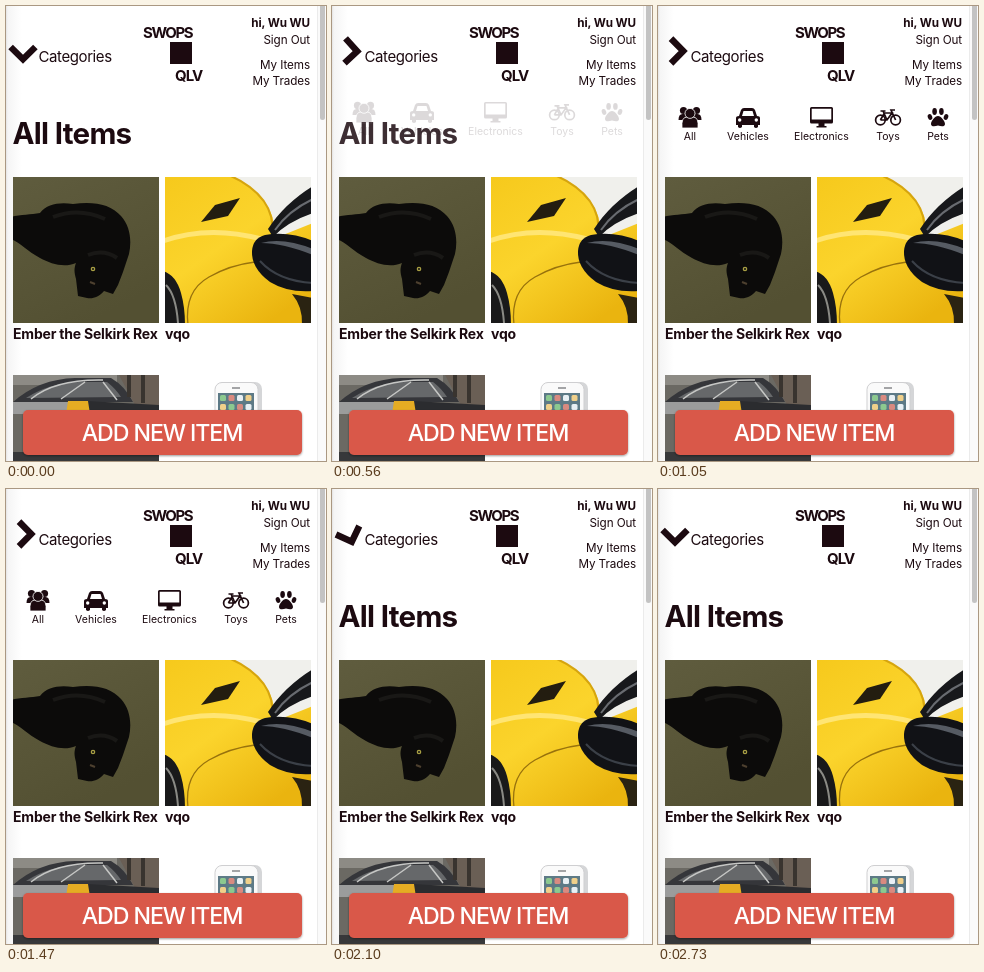
Recreate the animation shown at these times as an HTML page. Size 320 px wide and 455 px high, loop 2.8 s.

```html
<!DOCTYPE html>
<html lang="en">
<head>
<meta charset="utf-8">
<title>Item list</title>
<style>
html, body { margin: 0; width: 100%; height: 100%; overflow: hidden; background: #fff; }
svg { display: block; }
text { font-family: Inter, Roboto, "Liberation Sans", sans-serif; fill: #1c0a10; }
.bold { font-weight: 700; }
.nav { font-size: 11.7px; text-anchor: end; letter-spacing: -.1px; }
.name { font-size: 14px; font-weight: 700; letter-spacing: -.2px; }
#menu { font-size: 10.5px; text-anchor: middle; fill: #1c0a10; }
.line { fill: none; stroke: #1c0a10; stroke-width: 1.7; }
</style>
</head>
<body>
<svg width="320" height="455" viewBox="0 0 320 455">
  <defs>
    <linearGradient id="edge">
      <stop offset="0" stop-color="#e4e4e4"/><stop offset=".12" stop-color="#f5f5f5"/><stop offset="1" stop-color="#fff"/>
    </linearGradient>
    <linearGradient id="carpet" x2=".5" y2="1">
      <stop offset="0" stop-color="#5f5c3e"/><stop offset="1" stop-color="#535032"/>
    </linearGradient>
    <linearGradient id="paint" x2=".7" y2="1">
      <stop offset="0" stop-color="#f6c91c"/><stop offset=".5" stop-color="#fbd42c"/><stop offset="1" stop-color="#eab40f"/>
    </linearGradient>
    <clipPath id="frame"><path d="M0 0h146v146H0z"/></clipPath>
    <filter id="soft"><feGaussianBlur stdDeviation=".7"/></filter>
    <filter id="shade" x="-5%" y="-10%" width="110%" height="130%">
      <feDropShadow dx="0" dy="1" stdDeviation="1.3" flood-opacity=".4"/>
    </filter>
  </defs>

  <path d="M0 0h16v455H0z" fill="url(#edge)"/>
  <path d="M311 0h9v455h-9z" fill="#fafafa"/>
  <path d="M311.5 0v455" stroke="#ebebeb"/>
  <rect x="314" y="-4" width="5" height="118" rx="2.5" fill="#c3c3c3"/>

  <path id="arrow" d="M4.600 41L17 53.200 29.400 41" fill="none" stroke="#1c0a10" stroke-width="6.500"/>
  <text x="32.500" y="56" font-size="15" letter-spacing="-.4">Categories</text>

  <text class="bold" x="137" y="32" font-size="15" letter-spacing="-1.4">SWOPS</text>
  <path d="M164 36h22v22h-22z" fill="#1c0a10"/>
  <text class="bold" x="169" y="75" font-size="15" letter-spacing="-1">QLV</text>

  <text class="nav bold" x="304" y="21">hi, Wu WU</text>
  <text class="nav" x="304" y="38">Sign Out</text>
  <text class="nav" x="304" y="63">My Items</text>
  <text class="nav" x="304" y="79">My Trades</text>

  <text id="title" class="bold" x="6.500" y="138" font-size="29.500" letter-spacing="-.7">All Items</text>

  <g id="menu">
    <g transform="translate(32 111)">
      <circle cx="-6.5" cy="-6.5" r="3.6"/><circle cx="6.5" cy="-6.5" r="3.6"/>
      <path d="M-11.5 3q0-6 4-6h15q4 0 4 6z"/>
      <path d="M-8 11q-1-11 5-11h6q6 0 5 11z" stroke="#fff" stroke-width=".8"/>
      <circle cy="-3.6" r="5" stroke="#fff" stroke-width=".8"/>
      <text y="23">All</text>
    </g>
    <g transform="translate(90 111)">
      <path fill-rule="evenodd" d="M-12 8V1q0-2 3-2l2-6q1-2 3-2h8q2 0 3 2l2 6q3 0 3 2v7h-2v2q-2 2-4 0V8H-6v2q-2 2-4 0V8zM-6-1H6L4.500-6h-9z"/>
      <circle cx="-8.300" cy="3" r="1.700" fill="#fff"/><circle cx="8.300" cy="3" r="1.700" fill="#fff"/>
      <text y="23">Vehicles</text>
    </g>
    <g transform="translate(163.500 111)">
      <path fill-rule="evenodd" d="M-10-10h20q1.500 0 1.500 1.500V5q0 1.500-1.500 1.500H3V9h2v1.500H-5V9h2V6.500h-7q-1.500 0-1.500-1.500V-8.500q0-1.500 1.500-1.500zM-9.800-8.300V2.500H9.800V-8.300z"/>
      <text y="23">Electronics</text>
    </g>
    <g transform="translate(230 111)">
      <g class="line">
        <circle cx="-7.600" cy="3" r="4.800"/><circle cx="7.600" cy="3" r="4.800"/>
        <path d="M-7.600 3l4-7H4L-1 3h-6.600M-1 3l-4-9m-2.500 0h5M7.600 3L3-7h4"/>
      </g>
      <text y="23">Toys</text>
    </g>
    <g transform="translate(280 111)">
      <path d="M0-1c3 0 7 5 7 8s-4 2.500-7 1.500C-3 9.500-7 10-7 7s4-8 7-8z"/>
      <ellipse cx="-3.400" cy="-5.500" rx="2.300" ry="3.400"/><ellipse cx="3.400" cy="-5.500" rx="2.300" ry="3.400"/>
      <ellipse cx="-8" cy="0" rx="2.200" ry="3" transform="rotate(-20 -8 0)"/>
      <ellipse cx="8" cy="0" rx="2.200" ry="3" transform="rotate(20 8 0)"/>
      <text y="23">Pets</text>
    </g>
  </g>

  <!-- cat -->
  <g transform="translate(7 171)" clip-path="url(#frame)">
    <path d="M0 0h146v146H0z" fill="url(#carpet)"/>
    <g filter="url(#soft)">
      <path d="M-2 40C8 37 18 38 27 36 34 27 46 25 60 27c20-3 38 0 48 12 9 10 11 24 8 38l-6 18-5 13-5 9-9-3c-5 6-11 8-17 7l-9-2-2-17c-2-7-2-11 0-16-12 5-25 1-36-5C14 74 8 66-2 62z" fill="#0c0b0a"/>
      <path d="M40 40q26-10 52 2M75 78q16-6 29 3" fill="none" stroke="#191816" stroke-width="4"/>
      <circle cx="80" cy="92" r="2.300" fill="#a9a044"/><circle cx="80" cy="92" r="1" fill="#111"/>
      <path d="M77 105l5 2" stroke="#4d402f" stroke-width="2"/>
    </g>
  </g>

  <!-- yellow car -->
  <g transform="translate(159 171)" clip-path="url(#frame)">
    <path d="M0 0h146v146H0z" fill="url(#paint)"/>
    <g filter="url(#soft)">
      <path d="M64-2h84v48l-40 16Q116 24 64-2z" fill="#f0f0ec"/>
      <path d="M64-2Q112 20 107 58" fill="none" stroke="#d6a50e" stroke-width="2"/>
      <path d="M148 9Q119 27 103 52l5 8q14-15 40-24z" fill="#17181b"/>
      <path d="M148 22q-25 12-38 31" fill="none" stroke="#686b70" stroke-width="2"/>
      <path d="M36 45l14-17 25-7-12 18z" fill="#231d10"/>
      <path d="M-2 64Q44 48 96 62" fill="none" stroke="#ffe573" stroke-width="5"/>
      <path d="M23 148Q19 114 44 100 65 88 90 85" fill="none" stroke="#98720c" stroke-width="1.300"/>
      <path d="M-2 94q13 4 18 22 4 14 4 32H-2z" fill="#19191a"/>
      <path d="M1 108q10 10 12 38" fill="none" stroke="#8a8a85" stroke-width="2"/>
      <path d="M127 117l21 4v27h-11q1-18-10-31z" fill="#2a2312"/>
      <path d="M87 74q1-13 13-16 24-4 48 6v50q-25 2-43-9-19-14-18-31z" fill="#111216"/>
      <path d="M96 66q22-6 52 6v6q-30-12-52-12z" fill="#565b63"/>
      <path d="M95 84q18 20 53 22" fill="none" stroke="#3b4048" stroke-width="2"/>
    </g>
  </g>

  <text class="name" x="7" y="333">Ember the Selkirk Rex</text>
  <text class="name" x="159" y="333">vqo</text>

  <!-- silver car -->
  <g transform="translate(7 369)" clip-path="url(#frame)">
    <path d="M0 0h146v146H0z" fill="#6b6963"/>
    <g filter="url(#soft)">
      <path d="M0 0h104v10H0z" fill="#8d8b85"/>
      <path d="M0 27Q26 4 62 3h36q14 8 22 24z" fill="#35363a"/>
      <path d="M13 23Q36 8 66 7h28q9 7 14 15z" fill="#66686a"/>
      <path d="M18 24Q42 4 90 5M48 24L72 7m18 0l14 18" fill="none" stroke="#c6c7c5" stroke-width="1.500"/>
      <path d="M106 0h40v30h-24z" fill="#6a5f55"/>
      <path d="M116 0v22m14-22v28" stroke="#39342f" stroke-width="4"/>
      <path d="M0 27h56v12H0z" fill="#9b9c9c"/>
      <path d="M74 26l72 4v10H74z" fill="#2b2c2f"/>
      <path d="M55 26h20l2 13H53z" fill="#e5ac23"/>
      <path d="M0 77h146v12H0z" fill="#37383a"/>
    </g>
  </g>

  <!-- phone -->
  <rect x="211" y="376" width="45" height="70" rx="7" fill="#d5d6d8"/>
  <rect x="209" y="376.500" width="43" height="70" rx="7" fill="#fafafa" stroke="#cfcfd1"/>
  <path d="M226 382h8" stroke="#86878a" stroke-width="1.500"/>
  <path d="M212 387h36v55h-36z" fill="#5d7a86"/>
  <g id="apps"></g>

  <rect x="17" y="404" width="279" height="45" rx="5" fill="#d95848" filter="url(#shade)"/>
  <text x="156" y="435" font-size="23.200" font-weight="500" text-anchor="middle" letter-spacing="-1.1" style="fill:#fff">ADD NEW ITEM</text>
</svg>
<script>
const get = id => document.getElementById(id);
const ramp = (t, start, end) => Math.min(1, Math.max(0, (t - start) / (end - start)));
const ease = x => x * x * (3 - 2 * x);

const colors = ['#8cc98f', '#f0d08a', '#e8f0f4', '#d98a80'];
get('apps').innerHTML = Array.from({ length: 8 }, (_, i) =>
  `<rect x="${214 + i % 4 * 8.5}" y="${389 + (i >> 2) * 9}" width="6" height="6" rx="1.5" fill="${colors[(i * 3 + (i >> 2)) % 4]}"/>`
).join('');

function draw(now) {
  const t = Math.floor(now % 2800 / 70) * 70;
  const hovered = ease(ramp(t, 140, 300) - ramp(t, 2290, 2500));
  const turned = ease(ramp(t, 400, 580) - ramp(t, 1830, 2060));
  const open = ramp(t, 518, 798) - ramp(t, 1830, 2080);
  // hovering tilts the arrow a little, opening turns it to the right
  get('arrow').setAttribute('transform', `rotate(${-20 * hovered - 70 * turned} 17 45)`);
  get('title').setAttribute('opacity', 1 - open);
  get('menu').setAttribute('opacity', open);
  get('menu').setAttribute('transform', `translate(0 ${-6 * (1 - open)})`);
  requestAnimationFrame(draw);
}
draw(0);
</script>
</body>
</html>
```
